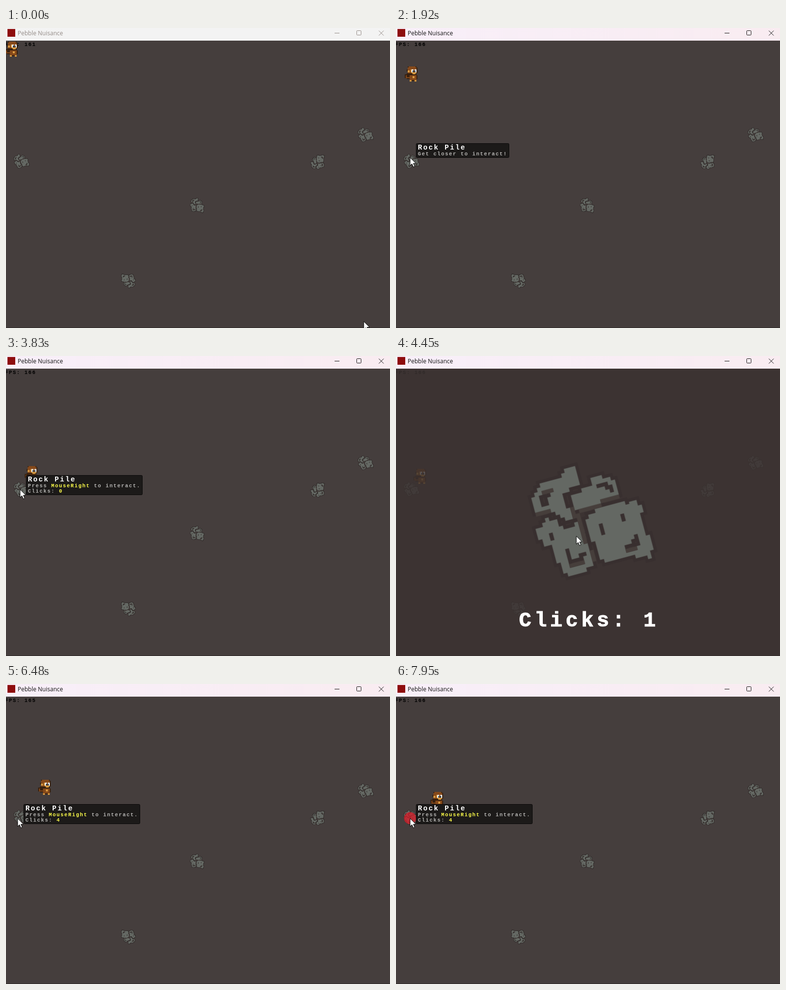
Recreate the animation shown at these times as an HTML page. Size 790 by 617 pixels, loop 8000 ms.

```html
<!DOCTYPE html>
<html lang="en">
<head>
<meta charset="utf-8">
<title>Pebble Nuisance</title>
<style>
html, body { margin: 0; width: 100%; height: 100%; overflow: hidden; background: #453e3d; }
svg { display: block; width: 790px; height: 617px; }

/* monospaced game lettering: one cell is 8, 11 or 32 px wide */
.game { font: bold 10.6px "Liberation Mono", "DejaVu Sans Mono", monospace; letter-spacing: 1.64px; white-space: pre; }
.head { font-size: 14.5px; letter-spacing: 2.3px; fill: #fff; }
.huge { font-size: 42.4px; letter-spacing: 6.56px; fill: #fff; stroke: #fff; }
.note { fill: #b4b3b1; }
.key { fill: #ffff4a; }
.title { font: 12px "Open Sans", "Noto Sans", sans-serif; fill: currentColor; }

.rocks { stroke: #2f2928; }
.big { stroke: #382f2f; transform-origin: 405px 341px; }
.stone { fill: #646863; fill-rule: evenodd; stroke-width: 1.7; paint-order: stroke; }
.shade { fill: #463e3b; stroke: none; }

.caption, .idle, .panel, .big, .far, .near, .hit { animation: 8s step-end infinite; }
.caption { animation-name: caption; }
.idle { animation-name: idle; }
.panel { animation-name: panel; }
.big { animation-name: press; }
.far { animation-name: far; }
.near { animation-name: near; }
.hit { animation-name: hit; }
.monkey { animation: walk 8s linear infinite; }
.pointer { animation: point 8s linear infinite; }

@keyframes caption { 0% { color: #938a86; } 12.5%, 100% { color: #111; } }
@keyframes idle { 0% { visibility: visible; } 12.5%, 100% { visibility: hidden; } }
@keyframes panel { 0% { visibility: hidden; } 48.75% { visibility: visible; } 68.75%, 100% { visibility: hidden; } }
@keyframes far { 0% { visibility: hidden; } 21.7% { visibility: visible; } 41.1%, 100% { visibility: hidden; } }
@keyframes near {
  0% { visibility: hidden; } 41.1% { visibility: visible; }
  48.75% { visibility: hidden; } 70.6%, 100% { visibility: visible; }
}
@keyframes hit { 0% { visibility: hidden; } 98.5%, 100% { visibility: visible; } }
@keyframes press {
  0%, 55.5%, 58.7%, 61.8%, 64.8%, 100% { transform: scale(1); }
  53%, 57.3%, 60.5%, 63.6% { transform: scale(1.17); }
}
@keyframes walk {
  0%, 15.6% { transform: translate(-2px, 28px); }
  24% { transform: translate(18px, 79px); }
  39.4% { transform: translate(63px, 172px); }
  48.75%, 69.5% { transform: translate(36px, 232px); }
  71.9%, 77.6% { transform: translate(50px, 221px); }
  81% { transform: translate(66px, 197px); }
  89.9% { transform: translate(103px, 149px); }
  98.5%, 100% { transform: translate(71px, 222px); }
}
@keyframes point {
  0%, .9% { transform: translate(736px, 603px); }
  5.2% { transform: translate(500px, 430px); }
  8.1% { transform: translate(262px, 255px); }
  10.1%, 12.5% { transform: translate(160px, 165px); }
  20.5% { transform: translate(62px, 232px); }
  21.7% { transform: translate(42px, 262px); }
  24%, 31.9% { transform: translate(29px, 266px); }
  39.4% { transform: translate(29px, 268px); }
  41.9%, 48.75% { transform: translate(29px, 274px); }
  52.1% { transform: translate(330px, 360px); }
  53.9%, 64.9% { transform: translate(371px, 370px); }
  66.6%, 67.5% { transform: translate(239px, 358px); }
  68.75% { transform: translate(110px, 305px); }
  71.25%, 97.6% { transform: translate(24px, 276px); }
  98.5%, 100% { transform: translate(29px, 276px); }
}
</style>
</head>
<body>
<svg viewBox="0 0 790 617">
  <defs>
    <linearGradient id="bar">
      <stop offset="0" stop-color="#f8eff9"/>
      <stop offset="1" stop-color="#f9ecf1"/>
    </linearGradient>
    <g id="rock" transform="translate(-16.7 -16.9)">
      <path class="stone" d="M13 2H16V7H13V8H11V12H12V15H10V14H9V13H8V12H7V11H3V7H4V6H5V5H6V4H12V3H13Z
        M5 7H6V6H9V7H8V8H7V10H5Z
        M19 6H22V7H24V8H25V12H20V13H13V9H16V8H19Z
        M20 8H23V9H24V11H23V10H22V9H20Z
        M18 14H26V15H27V14.5H29V16H30V18H29V24H30V28H29V30H28V29H25V28H17V27H16V22H15V16H16V15H18Z
        M18 18H19V21H18Z M24 17H25V19H24Z M26 23H27V26H26V27H23V25H25V24H26Z
        M5 13H6V14H8V16H9V17H12V16H13V22H14V28H12V29H7V28H6V25H5V20H3V18H2V15H4V14H5Z
        M5 17H6V19H5Z M8 22H9V25H11V24H13V25H12V27H8Z"/>
      <path class="shade" d="M3 11H7V12H3Z M20 12H25V13H20Z M14 13H20V14H14Z M13 14H14V22H13Z M8 26H12V27H8Z
        M23 26H26V27H23Z M14 24H15V27H14Z M12 12H13V15H12Z M6 6H9V7H6Z"/>
    </g>
  </defs>

  <rect width="790" height="617" fill="#453e3d"/>
  <path d="M0 616.5H790" stroke="#2f2a2a"/>

  <g class="rocks">
    <use href="#rock" transform="translate(32 274) rotate(-15)"/>
    <use href="#rock" transform="translate(740 219.5) rotate(-15)"/>
    <use href="#rock" transform="translate(642 275) rotate(-90)"/>
    <use href="#rock" transform="translate(394 365.5) rotate(6)"/>
    <use href="#rock" transform="translate(251 519) rotate(180)"/>
  </g>

  <text class="game" x="-2" y="37">FPS: <tspan id="fps">161</tspan></text>

  <g class="monkey">
    <g transform="scale(2)">
      <path fill="#37200f" d="M3 0H12V1H13V7H12V9H13V13H12V15H5V13H2V12H0V8H2V7H3V5H2V3H3Z"/>
      <path fill="#85491a" d="M4 0H11V1H12V7H3V1H4Z M5 9H12V14H5Z M1 9H2V11H5V12H1Z"/>
      <path fill="#d99a40" d="M3 4H5V6H3Z M6 3H7V6H6Z M7 6H12V7H7Z M8 7H11V8H8Z M8 10H10V12H8Z M5 14H7V15.5H5Z M10 14H12V15.5H10Z"/>
      <path fill="#fff" d="M7 3H9V6H7Z M10 3H12V6H10Z"/>
      <path fill="#27435c" d="M8 4H9V6H8Z M10 4H11V6H10Z"/>
    </g>
  </g>

  <g class="panel">
    <rect y="26" width="790" height="591" fill="#3a3231" fill-opacity=".83"/>
    <g class="big">
      <use href="#rock" transform="translate(404.5 340) rotate(-15) scale(8)"/>
    </g>
    <text class="game huge" x="253" y="556">Clicks: <tspan id="clicks">0</tspan></text>
  </g>

  <rect width="790" height="26" fill="url(#bar)"/>
  <rect class="idle" width="790" height="26" fill="#f3f3f3"/>
  <rect x="3" y="2" width="16" height="16" fill="#8e0d0d"/>
  <g class="caption">
    <text class="title" x="24" y="15">Pebble Nuisance</text>
    <g fill="none" stroke="currentColor">
      <path d="M676 10.5H686M767 5.5L777 15.5M777 5.5L767 15.5"/>
      <rect x="721.5" y="5.5" width="9" height="9" rx="1"/>
    </g>
  </g>

  <g class="pointer">
    <circle class="hit" cx="0" cy="0" r="12.5" fill="#d91c28" fill-opacity=".75"/>
    <g class="far" transform="translate(12 -29)">
      <rect x=".5" y=".5" width="191" height="29" rx="2" fill="#1c1a19" stroke="#0a0909"/>
      <text class="game head" x="4" y="13">Rock Pile</text>
      <text class="game note" x="4" y="25">Get closer to interact!</text>
    </g>
    <g class="near" transform="translate(12 -29)">
      <rect x=".5" y=".5" width="239" height="40" rx="2" fill="#1c1a19" stroke="#0a0909"/>
      <text class="game head" x="4" y="13">Rock Pile</text>
      <text class="game note" x="4" y="25">Press <tspan class="key">MouseRight</tspan> to interact.</text>
      <text class="game note" x="4" y="36">Clicks: <tspan class="key" id="total">0</tspan></text>
    </g>
    <path d="M0 .5V17L3.8 13.4L6.6 19.8L9.4 18.6L6.7 12.4H12Z" fill="#fff" stroke="#000"/>
  </g>
</svg>
<script>
const loop = 8000;
// [start in ms, value]
const rates = [[0, 161], [400, 163], [900, 164], [1500, 166], [2200, 167], [2900, 168],
  [3500, 167], [3800, 166], [5260, 167], [5700, 165], [7000, 164], [7600, 166]];
const counts = [[0, 0], [4440, 1], [4696, 2], [4944, 3], [5184, 4]];

const valueAt = (steps, t) => steps.filter(([start]) => start <= t).pop()[1];
const show = (id, value) => {
  const node = document.getElementById(id);
  if (node.textContent !== String(value)) node.textContent = value;
};

let begin;
function tick(now) {
  begin ??= now;
  const t = (now - begin) % loop;
  const clicks = valueAt(counts, t);
  show("fps", valueAt(rates, t));
  show("clicks", clicks);
  show("total", clicks);
  requestAnimationFrame(tick);
}
requestAnimationFrame(tick);
</script>
</body>
</html>
```
